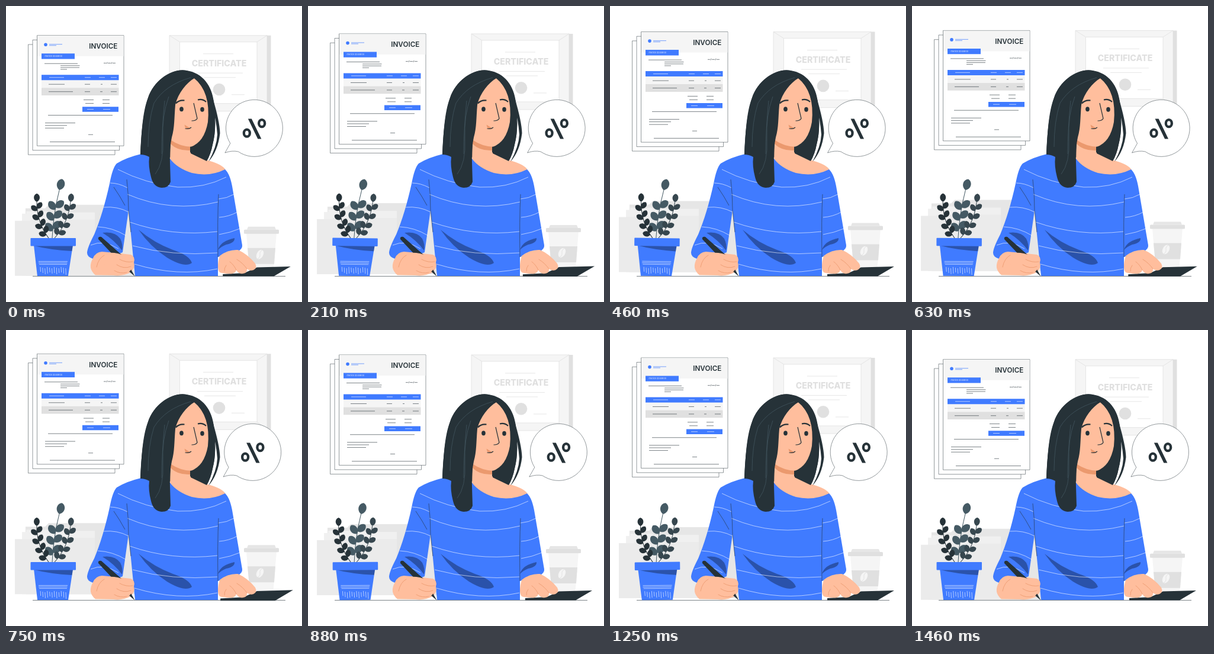
Recreate the animation shown at these times as an HTML page. Size 500 px wide and 500 px high, loop 1.5 s.

```html
<!DOCTYPE html>
<html lang="en">
<head>
<meta charset="utf-8">
<title>Invoice desk</title>
<style>
html, body { margin: 0; height: 100%; overflow: hidden; background: #fff; }
svg { display: block; width: 100vw; height: 100vh; }
text { font-family: Inter, "Open Sans", sans-serif; }
.blue { fill: #407bff; }
.dark { fill: #263238; }
.skin { fill: #ffbe9d; }
.tan { fill: #eb996e; }
.fold { fill: #000; opacity: .33; }
.line { fill: none; stroke: #263238; stroke-width: .6; }
.light { fill: none; stroke: #fff; stroke-width: .6; }
.pale { fill: none; stroke: #e0e0e0; stroke-width: .8; }
.crease { fill: none; stroke: #eb996e; stroke-width: .8; stroke-linecap: round; }
.page { fill: #fff; stroke: #263238; stroke-width: .5; }
</style>
</head>
<body>
<svg viewBox="0 0 500 500">
  <g id="backdrop">
    <g id="folders">
      <path fill="#e6e6e6" d="M33 342H66L72 336H222V456H33z"/>
      <path fill="#f0f0f0" d="M27 351H34V347H70L74 349H150V456H27z"/>
      <path fill="#ebebeb" d="M15 363H40L44 361H150V456H15z"/>
    </g>
    <g id="cup">
      <path fill="#f5f5f5" d="M406 384H457L451 456H412z"/>
      <path fill="#e0e0e0" d="M408 409H455L453 436H410.500z"/>
      <rect x="402" y="378" width="59" height="7" rx="1.500" fill="#e0e0e0"/>
      <path fill="#e6e6e6" d="M409 373H454L456 378H407z"/>
      <g transform="rotate(28 429 420)">
        <ellipse cx="429" cy="420" rx="5.500" ry="8.500" fill="#f5f5f5"/>
        <path class="pale" d="M429 411.500Q426 416 429 420T429 428.500"/>
      </g>
    </g>
    <g id="certificate">
      <path fill="#e0e0e0" d="M441 50H447.500V178H441z"/>
      <path fill="#f5f5f5" stroke="#e0e0e0" stroke-width=".8" d="M276 50H441V178H276z"/>
      <path class="pale" d="M276 50L293.500 61M441 50L424 61M441 178L424 165M276 178L293.500 165"/>
      <path class="pale" style="fill:#fff" d="M293.500 61H424V165H293.500z"/>
      <text x="360" y="102" font-size="14.200" font-weight="800" text-anchor="middle" fill="#e0e0e0">CERTIFICATE</text>
      <path class="pale" d="M333 81H384M323 113.500H400M335 121H388M381 150H403"/>
      <circle cx="360" cy="141.300" r="10.300" fill="#e0e0e0"/>
    </g>
    <g id="invoice">
      <path class="page" d="M37.500 65.300H184V251.500H37.500z"/>
      <path class="page" d="M45 57.600H191.500V244H45z"/>
      <path class="page" d="M52.500 50H199V236.500H52.500z"/>
      <path fill="#f5f5f5" d="M53 50.400H198.600V85H53z"/>
      <circle class="blue" cx="67" cy="65.500" r="2.800"/>
      <path d="M73 65H95M73 67H85" stroke="#407bff" stroke-width=".7"/>
      <text class="dark" x="164.300" y="72.400" font-size="11.700" font-weight="600" text-anchor="middle">INVOICE</text>
      <path fill="#f5f5f5" d="M60 125.500H190.500V138.500H60z"/>
      <path fill="#e0e0e0" d="M60 138.500H190.500V151.300H60z"/>
      <path class="blue" d="M60 80.500H116V89.800H60zM60 116.500H190.500V125.500H60zM129 170.500H190V179H129z"/>
      <text x="65.500" y="86.400" font-size="3.700" fill="#e8efff">Invoice #245800</text>
      <path class="line" d="M165 96.700h4m3 0h5m3 0h5M170 98l1-3M178 98l1-3M65 97.500H121M92 101H124.500M92 104.200H124M92 107.300H103
        M72 132.500H99M133 132.500H142M160 132.500H163M177 132.500H187M72 145H113M133 145H142M159 145H163M177 145H187
        M131 158.800H148M163 158.800H175M134 164.800H148M163 164.800H175M71 184.800H180
        M66 197.800H117M66 202H103M66 206.500H98M139 217.500H147M74 229.800H184"/>
      <path class="light" d="M73 121H98M133 121H143M157 121H167M177 121H187M137 174.800H148M164 174.800H176"/>
    </g>
  </g>

  <g id="bubble">
    <path class="page" d="M379 232L370 248Q382 243.500 392.500 246A48 48 0 1 0 379 232z"/>
    <g fill="none" stroke="#263238" stroke-width="4.300">
      <ellipse cx="407" cy="214.700" rx="5" ry="6"/>
      <ellipse cx="432.300" cy="198.200" rx="5" ry="6"/>
    </g>
    <path class="dark" d="M409 190.500H415L431.500 224.500H425.500z"/>
  </g>

  <path class="line" d="M45 456.500H472"/>

  <g id="plant">
    <g id="leaves"></g>
    <path class="blue" d="M47 404H113L105 456H53z"/>
    <path class="fold" d="M47.500 405H113L111.500 414Q74 412 47.500 405z"/>
    <rect class="blue" x="41.500" y="392" width="76.500" height="13.500" rx="1"/>
    <path class="light" id="hatch"/>
  </g>

  <g id="body">
    <path class="dark" d="M227 251C228 215 232 180 240 155C250 125 280 105 305 109C333 113 348 136 351 162C354 188 355 212 349 234Q346 250 339 262L312 250L280 256z"/>
    <path class="skin" d="M278 222L311 236V247Q325 256 345 262Q366 268 371 277Q335 300 290 285L277 265z"/>
    <path class="tan" d="M278 226Q292 236 311 237V244Q290 245 278 233z"/>
    <path class="skin" d="M318 122C300 130 284 142 281 172L278 226Q295 238 315 238C336 234 343 205 343 180Q341 140 318 122z"/>
  </g>

  <g id="shirt">
    <path class="blue" d="M228 250L277 258Q289 274 314 282Q344 289 370 276Q379 284 383 310L399 404Q400 411 390 415L358 424V456H218L207 345L197 416Q190 421 160 416L147 427Q137 424 137 417Q137 409 149 386Q164 350 175 300Q180 273 187 266Q203 256 228 250z"/>
    <g class="fold">
      <path d="M224 378Q250 400 282 412Q310 421 314 434Q302 443 272 425Q244 407 224 378z"/>
      <path d="M163 383Q184 380 193 393Q198 403 196 413Q184 396 163 383z"/>
      <path d="M358 412Q362 397 386 392Q387 400 372 403Q364 406 358 412z"/>
    </g>
    <path class="light" d="M189 276Q235 300 290 306Q335 308 372 289M176 299Q190 299 205 307M205 318Q280 350 358 331M359 326Q373 325 385 318
      M165 340Q188 338 207 348M360 357Q376 356 391 348M209 365Q280 390 357 381M155 373Q180 374 203 388M360 386Q379 383 395 376
      M214 405Q280 423 357 417M143 404Q165 394 190 410M217 436Q290 458 357 444"/>
    <path class="line" d="M204 293Q207 318 207 345L211 382M182 306Q193 322 201 337M359 318Q357 360 358 424"/>
  </g>

  <g id="hair">
    <path class="dark" d="M318 122C305 130 291 146 286 167C284 190 285 205 280 222Q276 240 277 264L278 297Q275 307 263 307Q249 306 245 289Q240 270 242 255Q235 251 227 251C229 218 230 180 240 155C250 125 282 104 305 109Q313 111 318 122z"/>
    <path class="dark" d="M314 113Q343 122 350 158C354 187 355 212 349 234Q346 250 339 262L312 249V238Q335 230 341 196Q346 145 318 122z"/>
    <path class="dark" d="M349 155Q361 195 361.500 215Q358 245 342 263Q356 238 357 217Q355 190 349 175z"/>
    <path fill="none" stroke="#455a64" stroke-width=".7" d="M312 121Q269 133 250 164Q240 195 240 238M275 153Q263 185 265 225T252 284M268 160Q263 210 263 250"/>
  </g>

  <g id="face">
    <ellipse class="dark" cx="296.500" cy="174.300" rx="3.300" ry="4"/>
    <ellipse class="dark" cx="331.500" cy="174.700" rx="3.300" ry="4"/>
    <path class="tan" d="M301.500 200.500L312 207Q303 211 301.500 200.500z"/>
    <path class="line" style="stroke-width:2.200" d="M287 164.500Q292 158.500 301.500 159.500M324 158.500Q332 156.500 338 162"/>
    <path class="line" style="stroke-width:1.200" d="M317 164L323 190Q321 194 313.500 194M302.500 207Q309 208.500 313 205"/>
  </g>

  <g id="writing-hand">
    <path class="skin" d="M147 426Q151 416 162 415L184 417L211 420Q219 424 216 433Q219 443 210 450Q198 457 181 455L151 454.500Q137 443 147 426z"/>
    <path class="dark" d="M156 394Q155 389 161 390L196 421L210 443L217.500 456.500L205 446L187 427z"/>
    <path class="skin" d="M172 417Q188 416 200 422Q213 418 216 425Q217 432 211 436Q215 443 208 449Q197 454 182 452L166 437z"/>
    <path class="crease" d="M192 428Q203 434 214 432M187 437Q199 445 211 440M183 447Q193 453 204 450M153 441Q156 426 166 421"/>
  </g>

  <path class="dark" id="calculator" d="M367 453L403 451L424 441.500L480 440L452 456.500H367z"/>
  <path class="skin" d="M361 422Q375 411 392 412Q408 419 421 435Q425 443 418 446Q412 448 407 444Q408 451 400 452Q393 453 389 446Q387 453 378 452Q368 452 361 450Q355 443 361 422z"/>
  <path class="crease" d="M378 432Q385 437 389 446M390 428Q400 434 407 444M372 438Q368 443 369 448"/>
</svg>

<script>
const $ = id => document.getElementById(id);

// A stem is a quadratic curve; leaves grow in pairs along it with one at the tip.
function stem(color, [x0, y0], [cx, cy], [x1, y1], length, pairs) {
  const leaf = (t, lean, size) => {
    const u = 1 - t;
    const x = u * u * x0 + 2 * u * t * cx + t * t * x1;
    const y = u * u * y0 + 2 * u * t * cy + t * t * y1;
    const dx = u * (cx - x0) + t * (x1 - cx);
    const dy = u * (cy - y0) + t * (y1 - cy);
    const angle = Math.atan2(dx, -dy) * 180 / Math.PI + lean;
    return `<path fill="${color}" transform="translate(${x} ${y}) rotate(${angle}) scale(${size})"
      d="M0 0C-.5-.25-.42-.88 0-1C.42-.88.5-.25 0 0"/>`;
  };
  $("leaves").innerHTML +=
    `<path d="M${x0} ${y0}Q${cx} ${cy} ${x1} ${y1}" fill="none" stroke="${color}"/>` + leaf(1, 0, length * 1.1) +
    pairs.map(t => leaf(t, -45, length) + leaf(t + .05, 42, length)).join("");
}
stem("#455a64", [78, 392], [80, 350], [90, 311], 17.5, [.14, .36, .58]);
stem("#263238", [72, 392], [52, 365], [52, 331], 13, [.1, .31, .55, .78]);
stem("#37474f", [82, 392], [105, 367], [109, 331], 13, [.1, .31, .55, .78]);

let hatch = "M55 431.500H104M55 434H103.500M56 436.500H103";
for (let i = 0; i < 12; i++) hatch += `M${58 + i * 3.9} ${441 + i % 3}l.6 ${8 + i * 5 % 4}`;
$("hatch").setAttribute("d", hatch);

// Linear interpolation between [percent, value] stops.
function track(p, stops) {
  const i = Math.max(1, stops.findIndex(s => s[0] >= p));
  const [a, from] = stops[i - 1], [b, to] = stops[i];
  return from + (to - from) * (p - a) / (b - a);
}
const FLOAT = [[0, 0], [50, -10], [100, 0]];
const SHAKE = [[0, 0], [10, -1], [20, 2], [30, -4], [40, 4], [50, -4], [60, 4], [70, -4], [80, 2], [90, -1], [100, 0]];
const SWAY = [[0, 0], [25, 1], [75, -1], [100, 0]];
const BEAT = [[0, 1], [10, 1.1], [30, 1], [40, 1], [50, 1.1], [60, 1], [100, 1]];
const LOOP = 1500, STEPS = 36;

function draw() {
  const step = Math.floor(performance.now() % LOOP / LOOP * STEPS + .1) % STEPS;
  const p = (step + .5) / STEPS * 100;
  const move = (id, value) => $(id).setAttribute("transform", value);
  move("backdrop", `translate(0 ${track(p, FLOAT)})`);
  move("bubble", `translate(${track(p, SHAKE)} 0)`);
  move("plant", `rotate(${track(p, SWAY)} 80 375)`);
  move("calculator", `translate(423.5 448.3) scale(${track(p, BEAT)}) translate(-423.5 -448.3)`);
  requestAnimationFrame(draw);
}
draw();
</script>
</body>
</html>
```
